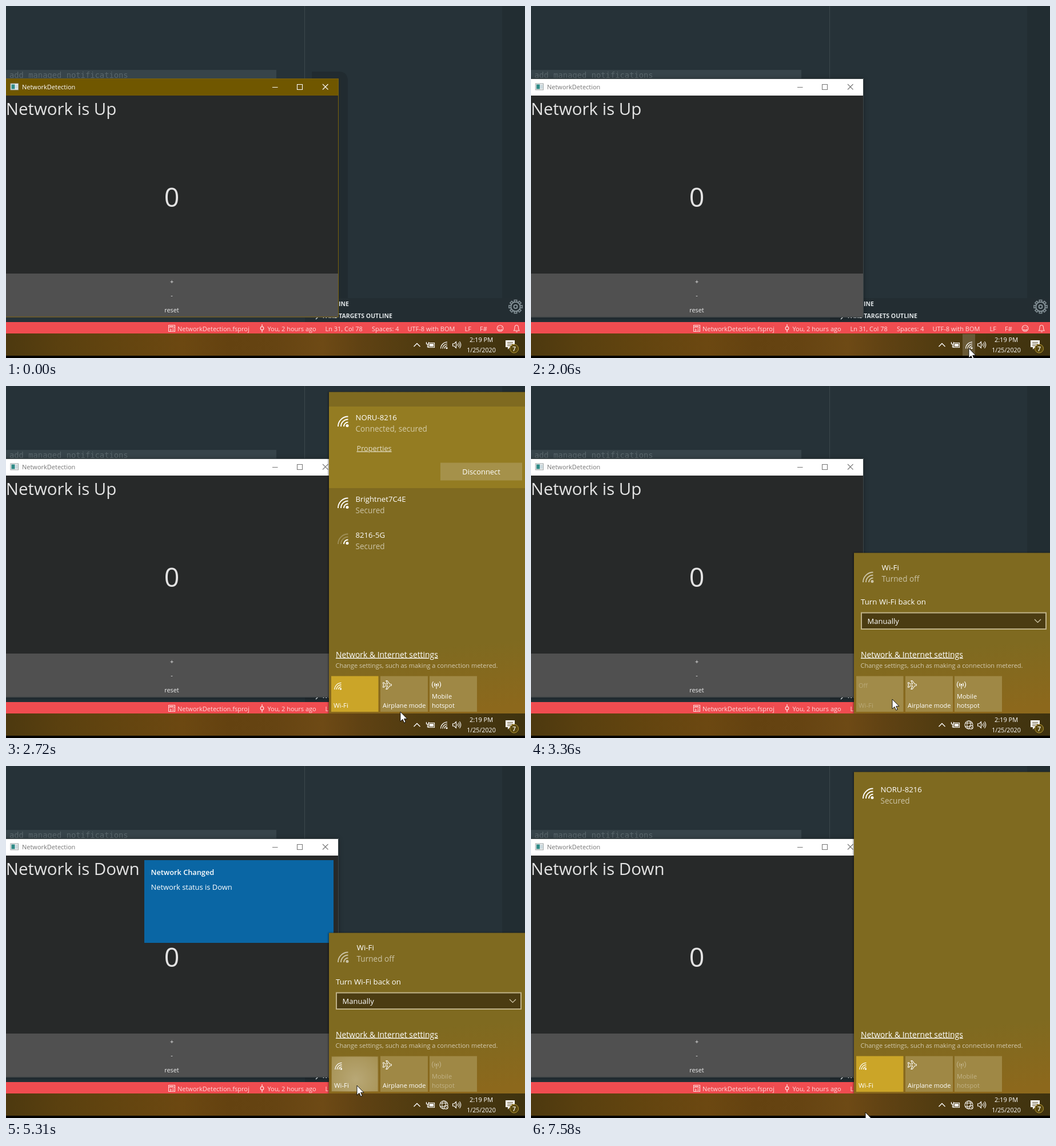
An HTML page for the animation above (8000 ms loop, 908 by 617 pixels).

```html
<!DOCTYPE html>
<html lang="en">
<head>
<meta charset="utf-8">
<title>Network detection</title>
<style>
  html, body { margin: 0; width: 100%; height: 100%; overflow: hidden; background: #263238; }
  svg { display: block; width: 908px; height: 617px; }
  text { font-family: "Open Sans", "Noto Sans", sans-serif; white-space: pre; }
  .line { fill: none; stroke: currentColor; }
</style>
</head>
<body>
<svg id="stage" viewBox="0 0 908 617" xmlns="http://www.w3.org/2000/svg"></svg>
<script>
const LOOP = 8000;
const stage = document.getElementById('stage');

const label = (x, y, size, str, fill = '#fff', extra = '') =>
  `<text x="${x}" y="${y}" font-size="${size}" fill="${fill}" ${extra}>${str}</text>`;
const box = (x, y, w, h, fill, extra = '') =>
  `<rect x="${x}" y="${y}" width="${w}" height="${h}" fill="${fill}" ${extra}/>`;
const line = (d, width = 1, extra = '') =>
  `<path class="line" d="${d}" stroke-width="${width}" ${extra}/>`;
const fan = r => `M${-r} 0A${r} ${r} 0 0 1 0 ${-r}`;
const wifi = (x, y, scale = 1, weak = false) =>
  `<g transform="translate(${x} ${y}) scale(${scale})" color="#fff">
    <circle r="2.5" cx="-1.5" cy="-1.5" fill="#fff"/>${line(fan(7.5), 1.9)}
    ${line(fan(12.5) + fan(17.5), 1.9, weak ? 'opacity=".25"' : '')}</g>`;

const soft = 'rgba(255,255,255,.6)';
const statusText = '#ffd9d9';

function gear() {
  const teeth = Array.from({length: 8}, (_, i) =>
    `<rect x="-2.2" y="-11.5" width="4.4" height="5" transform="rotate(${i * 45})" fill="none" stroke="#839096" stroke-width="1.6"/>`);
  return `<g transform="translate(891.5 527)">${teeth.join('')}
    <circle r="8.2" fill="#232d32" stroke="#839096" stroke-width="2"/>
    <circle r="3" fill="none" stroke="#839096" stroke-width="2"/></g>`;
}

const editor = `
  ${box(0, 0, 908, 617, '#263238')}
  ${box(868, 0, 40, 554, '#222d32')}
  ${box(523, 512, 385, 42, '#232d32')}
  ${box(522, 0, 1, 127, '#3b474c')}
  ${box(0, 112, 473, 16, '#37444a')}
  <text x="6" y="126" font-size="13.8" fill="#59666b" style="font-family:'DejaVu Sans Mono',monospace">add managed notifications</text>
  <path id="wideShadow" fill="#212b30" d="M535 115H584Q598 116 598 132V512H535Z"/>
  ${box(-20, 128, 602, 419, '#000', 'id="slimShadow" opacity=".35" filter="url(#blur)"')}
  ${label(600, 526, 10.5, 'OUTLINE', '#dde2e4', 'font-weight="700" text-anchor="end"')}
  ${label(676, 547, 10.5, 'FAKE TARGETS OUTLINE', '#dde2e4', 'font-weight="700" text-anchor="end"')}
  <g color="#dde2e4">${line('M542 549L547 544L543 540', 1.2)}</g>
  ${gear()}`;

const statusBar = `
  ${box(0, 554, 908, 20, '#f04c50')}
  ${box(0, 555, 0, 19, '#000', 'id="hover" opacity=".2"')}
  <g color="${statusText}">
    ${line('M284.5 559.5H295.5V570.5H284.5ZM284.5 563H295.5M287 566L289 568L287 570M291 566H294M291 568.5H294M286 561.5H293', 1.1)}
    ${line('M448 558V562M448 568V572', 1.3)}<circle class="line" cx="448" cy="565" r="2.8" stroke-width="1.3"/>
    <circle class="line" cx="864.5" cy="565" r="5.3" stroke-width="1.1"/>
    ${line('M861.5 566.5Q864.5 570 867.5 566.5M862.5 563V564M866.5 563V564', 1.2)}
    ${line('M888.5 569H898Q896.5 567 896.5 564Q896.5 559.5 893.2 559.5Q890 559.5 890 564Q890 567 888.5 569ZM892 571H895', 1.1)}
  </g>
  ${[[300, 'NetworkDetection.fsproj'], [457.5, 'You, 2 hours ago'], [558.5, 'Ln 31, Col 78'], [640, 'Spaces: 4'],
     [702.5, 'UTF-8 with BOM'], [802.5, 'LF'], [829, 'F#']]
    .map(([x, str]) => label(x, 569.5, 11, str, statusText)).join('')}`;

const taskbar = `
  ${box(0, 574, 908, 39, 'url(#wood)')}
  ${box(0, 613, 908, 4, '#000')}
  ${box(0, 575, 22, 38, '#fff', 'id="slot" opacity=".16"')}
  <g color="#fff">
    ${line('M713.5 597L719 591.5L724.5 597', 1.4)}
    ${line('M739.5 590.5H749.5V598.5H739.5Z', 1.1)}${box(741, 592, 7, 5, '#fff')}
    ${line('M735.5 589V592.5H739.5V589M737.5 592.5V598H739', 1.2)}
    <g id="online">${wifi(772, 600.5, 0.65)}</g>
    <g id="offline"><circle class="line" cx="766" cy="594" r="7" stroke-width="1.1"/>
      <ellipse class="line" cx="766" cy="594" rx="3.2" ry="7"/>${line('M760 591H772M759.5 597H768')}
      <circle cx="770" cy="598" r="4" fill="#4e3a10"/><circle class="line" cx="770" cy="598" r="3.2" stroke-width="1.2"/>${line('M768 596L772 600')}</g>
    ${line('M781.5 592V596H784L787.5 599.5V588.5L784 592Z', 1.1)}
    ${line('M789.5 592Q791 594 789.5 596M791.5 590Q794.5 594 791.5 598M793.5 588Q798 594 793.5 600', 1.1)}
  </g>
  ${label(831.5, 589, 11, '2:19 PM', '#fff', 'text-anchor="middle"')}
  ${label(831.5, 606.5, 10.7, '1/25/2020', '#fff', 'text-anchor="middle"')}
  <path d="M874 586H890V598H882L878 602V598H874Z" fill="#fff"/>
  <g color="#4a3a12">${line('M877 589.5H887M877 592.5H887M877 595.5H884')}</g>
  <circle cx="889" cy="600.5" r="7.5" fill="#59480f" stroke="#b89b3a"/>
  ${label(889, 604.5, 10.5, '7', '#fff', 'text-anchor="middle" font-weight="600"')}`;

const appWindow = `
  <g clip-path="url(#appClip)">
    ${box(0, 127, 582, 419, '#272929')}
    ${box(0, 127, 582, 30, '#705700', 'id="titleBar"')}
    ${box(8, 136, 13.5, 11, '#f4f4f4', 'stroke="#9aa3a3"')}
    ${box(9.5, 137.5, 6, 8, '#2e8a86')}${box(16.5, 138, 4, 7, '#c9d9df')}
    <g id="titleInk" color="#fff">
      ${label(28, 146, 11, 'NetworkDetection', 'currentColor')}
      ${line('M466 142.5H475.5M509.5 137.5H518.5V146.5H509.5ZM554 137L563.5 146.5M563.5 137L554 146.5', 1.1)}
    </g>
    <text id="status" x="-.2" y="191" font-size="29.45" fill="#e3e3e3"></text>
    ${label(290, 352, 46.5, '0', '#e3e3e3', 'text-anchor="middle"')}
    ${box(0, 469, 582, 77, '#505050')}
    ${[[486.5, '+'], [511, '-'], [536.5, 'reset']].map(([y, str]) =>
      label(290, y, 10.8, str, '#eee', 'text-anchor="middle"')).join('')}
    <g id="toast">
      ${box(242, 165, 331, 145, '#0a66a4')}
      ${label(253.5, 191, 12.75, 'Network Changed', '#fff', 'font-weight="600"')}
      ${label(253.5, 217, 12.9, 'Network status is Down')}
    </g>
    <path id="frame" d="M0 127.5H581.5V545H0" fill="none" stroke="#7a610c"/>
  </g>`;

const network = (x, y, name, note, weak) =>
  wifi(598.5, y + 11, 1, weak) + label(x, y, 13.2, name) + label(x, y + 19.5, 13.6, note, soft);

const panel = `
  <g id="panel" clip-path="url(#panelClip)"><g id="slide">
    <rect id="edge" x="564" width="350" fill="#000" opacity=".5" filter="url(#blurSmall)"/>
    <rect id="sheet" x="565" width="343" fill="url(#gold)"/>
    <g id="joined">
      ${box(565, 36, 343, 143, '#947c22')}
      ${network(611.5, 60, 'NORU-8216', 'Connected, secured')}
      ${label(613.5, 113.5, 12.7, 'Properties', 'rgba(255,255,255,.75)', 'text-decoration="underline"')}
      ${box(760, 134.5, 143, 31, '#a5914a')}
      ${label(831.5, 154.5, 12.9, 'Disconnect', '#fff', 'text-anchor="middle"')}
      ${network(611.5, 203, 'Brightnet7C4E', 'Secured')}
      ${network(611.5, 266, '8216-5G', 'Secured', true)}
    </g>
    <g id="turnedOff">
      <g opacity=".6">${wifi(598.5, 344)}</g>
      ${label(613.5, 323, 13.4, 'Wi-Fi')}${label(613.5, 343, 13.6, 'Turned off', soft)}
      ${label(577, 382.5, 13.3, 'Turn Wi-Fi back on')}
      ${box(578, 397.5, 323, 28.5, '#4b3c12', 'stroke="#c0b288" stroke-width="2"')}
      ${label(588.5, 416.5, 13, 'Manually')}
      <g color="#d8cfb0">${line('M881 409L886.5 414.5L892 409', 1.2)}</g>
    </g>
    <g id="found">${network(611.5, 46, 'NORU-8216', 'Secured')}</g>
    ${label(577, 475.5, 13.9, 'Network &amp; Internet settings', '#fff', 'text-decoration="underline"')}
    ${label(576.5, 494, 11, 'Change settings, such as making a connection metered.', 'rgba(255,255,255,.65)')}
    <rect id="tile"/>
    ${box(569, 508.5, 82.5, 62.5, 'url(#glowFill)', 'id="glow"')}
    <g id="tileInk">
      <g id="tileIcon">${wifi(586.5, 532, 0.66)}</g>
      <text id="tileState" x="573" y="529" font-size="11" fill="#fff"></text>
      ${label(573, 563.5, 11.4, 'Wi-Fi')}
    </g>
    ${box(655, 508.5, 83, 62.5, '#9f8845')}${box(741, 508.5, 83, 62.5, '#9f8845')}
    <g color="#fff">${line('M659.5 520H661.5L663.5 522.5H667.5L665 516.5H667L671.5 522.5H673.5Q675.5 524 673.5 525.5H671.5L667 531.5H665L667.5 525.5H663.5L661.5 528H659.5L660.5 524Z', 1.1)}</g>
    ${label(659, 563.5, 11, 'Airplane mode')}
    <g id="hotspot" color="#fff">
      ${line('M753 524V531M750.5 520.5Q748.5 523.5 750.5 526.5M755.5 520.5Q757.5 523.5 755.5 526.5M747.5 518Q743.5 523.5 747.5 529M758.5 518Q762.5 523.5 758.5 529', 1.1)}
      <circle cx="753" cy="523.5" r="1.4" fill="#fff"/>
      ${label(745, 548, 11, 'Mobile')}${label(745, 563.5, 11, 'hotspot')}
    </g>
  </g></g>`;

const pointer = `
  <path id="arrow" d="M0 0V17L4 13.3L6.7 19.3L9.3 18.2L6.7 12.3H12Z" fill="#fff" stroke="#000" stroke-width=".9"/>
  <path id="hand" d="M-1.5 1Q0 -1.5 1.7 1V7L9 8.5Q11 9.2 11 11V15L9.5 21.5H1L-4.5 13.5Q-5.5 10.5 -3.5 10.5L-1.5 12.5Z" fill="#fff" stroke="#000" stroke-width=".9"/>`;

stage.innerHTML = `
  <defs>
    <linearGradient id="wood">
      ${[[0, '#4d390f'], [.1, '#5a400f'], [.2, '#62440f'], [.34, '#6c4811'], [.43, '#644210'], [.52, '#664412'],
         [.61, '#6e4a15'], [.68, '#604213'], [.8, '#4f3b10'], [1, '#3e320f']]
        .map(([at, color]) => `<stop offset="${at}" stop-color="${color}"/>`).join('')}
    </linearGradient>
    <linearGradient id="gold" gradientUnits="userSpaceOnUse" x1="700" y1="0" x2="760" y2="574">
      <stop offset="0" stop-color="#7f6a20"/><stop offset=".8" stop-color="#7f6a20"/><stop offset="1" stop-color="#8c681c"/>
    </linearGradient>
    <radialGradient id="glowFill" gradientUnits="userSpaceOnUse" cx="612" cy="550" r="60">
      <stop offset="0" stop-color="#fff" stop-opacity=".25"/><stop offset="1" stop-color="#fff" stop-opacity=".04"/>
    </radialGradient>
    <filter id="blur"><feGaussianBlur stdDeviation="4"/></filter>
    <filter id="blurSmall"><feGaussianBlur stdDeviation="1.5"/></filter>
    <clipPath id="appClip"><rect y="127" width="582" height="419"/></clipPath>
    <clipPath id="panelClip"><rect x="559" width="349" height="574"/></clipPath>
  </defs>
  ${editor}${statusBar}${taskbar}${appWindow}${panel}${pointer}`;

const el = Object.fromEntries([...stage.querySelectorAll('[id]')].map(node => [node.id, node]));
const set = (id, attrs) => { for (const key in attrs) el[id].setAttribute(key, attrs[key]); };
const show = (id, on) => set(id, {visibility: on ? 'inherit' : 'hidden'});
const clamp = v => Math.max(0, Math.min(1, v));
const ramp = (t, from, to) => clamp((t - from) / (to - from));
const mix = (a, b, p) => a + (b - a) * p;

// time, x, y
const path = [
  [490, 149, 417], [720, 430, 490], [900, 740, 556], [1010, 836, 569], [1130, 803, 571], [1280, 789, 590],
  [1310, 788, 592], [1640, 766, 600], [2420, 766, 600], [2950, 632, 549], [3420, 632, 549],
  [3970, 608, 608], [4790, 608, 608], [5310, 614, 560], [5600, 614, 560], [6100, 585, 607]
];
function pointerAt(t) {
  const next = path.findIndex(p => p[0] > t);
  if (next < 0) return path[path.length - 1].slice(1);
  const [a, b] = [path[Math.max(0, next - 1)], path[next]];
  const p = ramp(t, a[0], b[0]);
  return [mix(a[1], b[1], p), mix(a[2], b[2], p)];
}
const statusItems = [[280, 428], [442, 546], [555, 628], [636, 690], [699, 791], [798, 819], [825, 846]];

function drawPointer(t, open) {
  const [x, y] = pointerAt(t);
  const visible = t >= 490;
  const item = visible && !open && y > 555 && y < 574 && statusItems.find(([a, b]) => x > a && x < b);
  show('hover', item);
  if (item) set('hover', {x: item[0], width: item[1] - item[0]});
  const onTray = visible && y > 575 && x >= 755 && x < 799;
  show('slot', onTray);
  if (onTray) set('slot', {x: x < 777 ? 755 : 777});
  show('hand', item);
  show('arrow', visible && !item);
  for (const id of ['hand', 'arrow']) set(id, {transform: `translate(${x} ${y})`});
  show('glow', t > 3900 && t < 5600 && x > 569 && x < 651 && y < 571 && y > 509);
}

function drawToast(t) {
  const visible = t >= 3520 && t < 7495;
  show('toast', visible);
  if (!visible) return;
  const enter = ramp(t, 3520, 3970) ** 2;
  const leave = clamp((1 - (1 - ramp(t, 6970, 7720)) ** 2) / 0.7);
  const y = enter < 0.3 ? mix(20, -20, enter / 0.3) : mix(-20, 0, (enter - 0.3) / 0.7);
  const scale = mix(0.85, 1, enter);
  set('toast', {
    opacity: enter * (1 - leave),
    transform: `translate(${800 * leave} ${y}) translate(407.5 274) scale(${scale}) translate(-407.5 -274)`
  });
}

function drawPanel(t) {
  const open = t >= 2200;
  show('panel', open);
  if (!open) return;
  const off = t >= 3230 && t < 5540;
  const short = t >= 3230 && t < 5620;
  const top = short ? 292.5 : 10.5;
  const lift = 120 * Math.exp(-(t - 2200) / 46);
  set('slide', {transform: `translate(0 ${lift > 0.3 ? lift : 0})`});
  for (const id of ['sheet', 'edge']) set(id, {y: top, height: 574 - top});
  show('joined', t < 3230);
  set('joined', {opacity: ramp(t, 2200, 2395)});
  show('turnedOff', short);
  show('found', t >= 5620);
  set('found', {opacity: ramp(t, 5700, 5950)});

  const inset = t >= 5260 && t < 5540 ? 1 : 0;
  set('tile', {x: 569 + inset, y: 508.5 + inset, width: 82.5 - 2 * inset, height: 62.5 - 2 * inset, fill: off ? '#a18b49' : '#cba528'});
  const named = (t >= 3230 && t < 5150) || (t >= 5540 && t < 7540);
  show('tileIcon', !named);
  show('tileState', named);
  el.tileState.textContent = off ? 'Off' : 'On';
  set('tileInk', {opacity: off ? mix(0.25, 1, ramp(t, 3500, 3900)) : 1, transform: `translate(${inset} 0)`});
  set('hotspot', {opacity: t >= 3600 ? 0.35 : 1});
}

function render(t) {
  const active = t < 2020;
  set('titleBar', {fill: active ? '#705700' : '#fff'});
  set('titleInk', {color: active ? '#fff' : '#777'});
  set('frame', {stroke: active ? '#7a610c' : '#3c4547'});
  show('wideShadow', active);
  show('slimShadow', !active);
  el.status.textContent = 'Network is ' + (t < 3500 ? 'Up' : 'Down');
  show('online', t < 3300);
  show('offline', t >= 3300);
  drawToast(t);
  drawPanel(t);
  drawPointer(t, t >= 2200);
}

function tick() {
  render(performance.now() % LOOP);
  requestAnimationFrame(tick);
}
tick();
</script>
</body>
</html>
```
